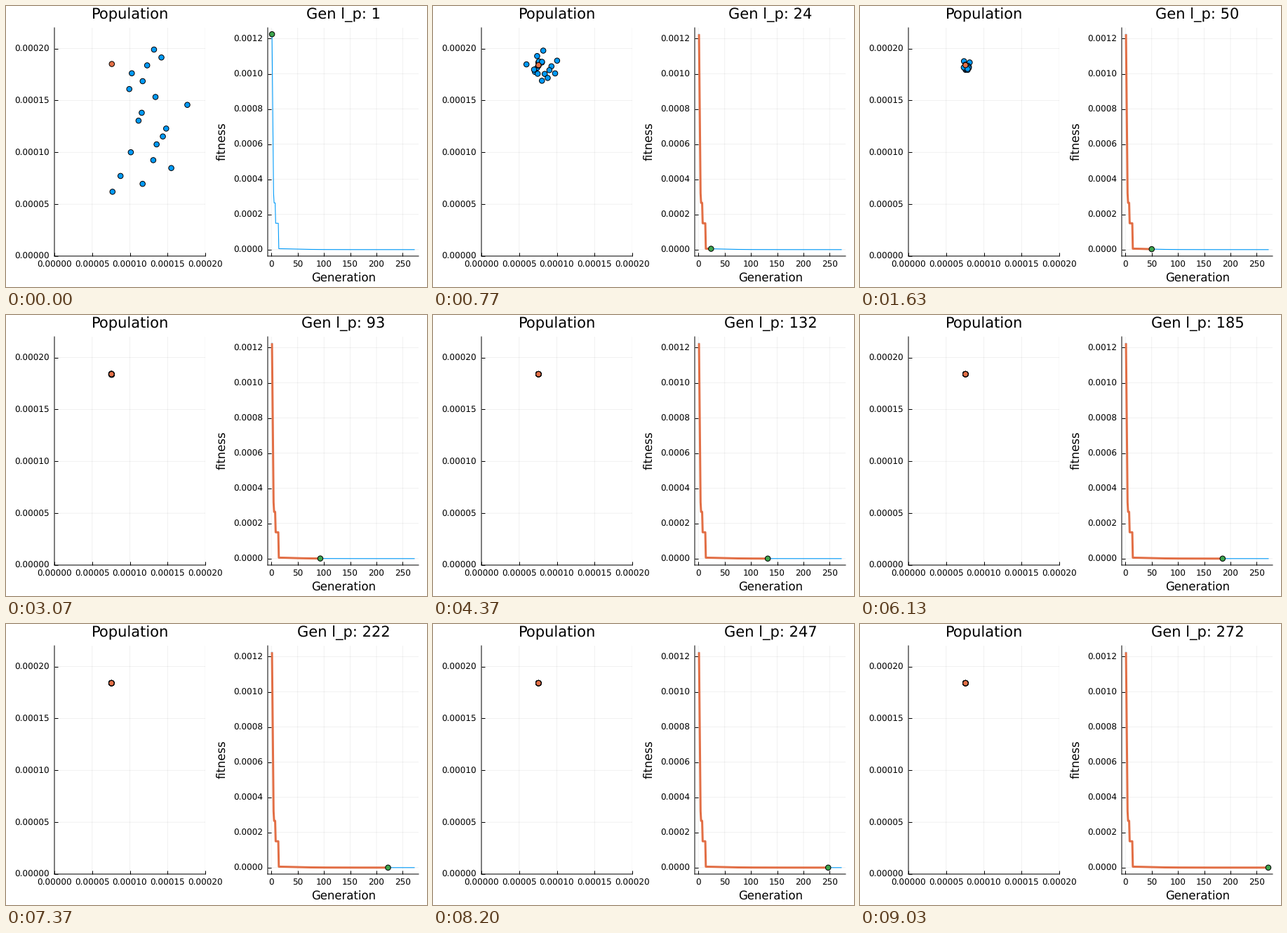
These frames come from a looping animation (600 by 400 pixels, 9060 ms). A matplotlib script:

```python
import numpy as np
import matplotlib.pyplot as plt
from matplotlib.animation import FuncAnimation
from matplotlib.transforms import Affine2D

W, H, DPI = 600, 400, 100
LOOP, STEP = 9060, 30
GENS, MEMBERS = 272, 19
BLUE, ORANGE, GREEN = "#009af9", "#e26f46", "#3da44d"

plt.rcParams.update({"font.family": "DejaVu Sans", "text.hinting": "none",
                     "path.snap": False})


def pt(px):
    return px * 72 / DPI


gens = np.arange(1, GENS + 1)


def fitness():
    """Four linear drops on top of a slowly fading tail."""
    total = 5.5 / (1 + (gens / 50) ** 3)
    for a, b, size in (1, 4, 905), (4, 5, 54), (7, 8, 116), (13, 14, 144.5):
        total += size * np.clip((b - gens) / (b - a), 0, 1)
    return total * 1e-6


def evolve(best):
    """Each member holds its place until it hops closer to the optimum."""
    rng = np.random.default_rng(7)
    centre = np.array([75.7, 184])
    x = np.clip(rng.normal(132, 33, MEMBERS), 77, 198)
    first = np.column_stack([x, np.linspace(199, 62, MEMBERS)]) - centre
    off = first
    swarm = [off]
    for g in gens[1:]:
        pull = rng.random((MEMBERS, 1))
        noise, wild = rng.normal(size=(2, MEMBERS, 2))
        near = (0.8 * pull * first + 25 * noise) * np.exp(-g / 18)
        far = np.clip(wild * (8 if g < 95 else 0.9 * np.exp((95 - g) / 90)), -16, 16)
        stray = rng.random((MEMBERS, 1)) < (0.035 if g < 253 else 0)
        hop = rng.random((MEMBERS, 1)) < 0.4
        off = np.where(hop, np.where(stray, far, near), off)
        swarm.append(off)
    lead = np.outer(best / best[0], [0.4, 1.1])
    return (np.concatenate([swarm, lead[:, None]], axis=1) + centre) * 1e-6


fit = fitness()
swarm = evolve(fit)

fig = plt.figure(figsize=(W / DPI, H / DPI), dpi=DPI, facecolor="white")


def label(x, y, s, px, **kw):
    return fig.text(x / W, 1 - y / H, s, fontsize=pt(px), ha="center", **kw)


def panel(x0, xlim, ylim, xticks, yticks, xfmt, yfmt):
    ax = fig.add_axes([x0 / W, 44 / H, 215 / W, 325 / H], xlim=xlim, ylim=ylim)
    ax.set_xticks(xticks, [format(v, xfmt) for v in xticks])
    ax.set_yticks(yticks, [format(v, yfmt) for v in yticks])
    ax.tick_params(direction="in", length=pt(5), width=pt(1),
                   labelsize=pt(12), pad=pt(7))
    for t in ax.get_yticklabels():
        t.set_va("center")
        t.set_transform(t.get_transform() + Affine2D().translate(0, -1))
    ax.spines[["top", "right"]].set_visible(False)
    ax.spines[["left", "bottom"]].set_linewidth(pt(1))
    ax.grid(color="black", alpha=0.07, linewidth=pt(0.8))
    ax.set_axisbelow(True)
    return ax


def dots(ax, xy, colors):
    # Two or more face colours keep the markers off the pixel grid.
    d = ax.scatter(*np.transpose(xy), s=pt(7.5) ** 2, edgecolors="black",
                   linewidths=pt(1), zorder=5)
    d.set_facecolor(colors)
    return d


fifths = np.arange(5) * 5e-5
pop_ax = panel(69, (0, 2e-4), (0, 2.2e-4), fifths, fifths, ".5f", ".5f")
pad = 0.03
fit_ax = panel(373, (1 - pad * (GENS - 1), GENS + pad * (GENS - 1)),
               (-pad * fit[0], (1 + pad) * fit[0]),
               np.arange(0, 251, 50), np.arange(7) * 2e-4, "d", ".4f")

label(177.5, 18.5, "Population", 21)
label(481, 393, "Generation", 16.5)
label(309, 193, "fitness", 16.5, va="center", rotation=90)
title = label(481, 18.5, "", 21)

members = dots(pop_ax, swarm[0], [BLUE] * MEMBERS + [ORANGE])
fit_ax.plot(gens, fit, color=BLUE, lw=pt(1.1), zorder=3)
trail, = fit_ax.plot([], [], color=ORANGE, lw=pt(3), zorder=4,
                     solid_capstyle="butt")
head = dots(fit_ax, [(1, fit[0])], [GREEN, GREEN])


def generation(ms):
    """Generations last 30, 40 and 30 ms in turn."""
    block, rest = divmod(ms, 100)
    return min(3 * block + (rest >= 30) + (rest >= 70), GENS - 1)


def update(k):
    i = generation(k * STEP + 20)
    members.set_offsets(swarm[i])
    trail.set_data(gens[:i + 1], fit[:i + 1])
    head.set_offsets([(gens[i], fit[i])])
    title.set_text(f"Gen l_p: {gens[i]}")
    return members, trail, head, title


anim = FuncAnimation(fig, update, frames=LOOP // STEP, interval=STEP,
                     repeat=True, repeat_delay=0, blit=False)
plt.show()
```
